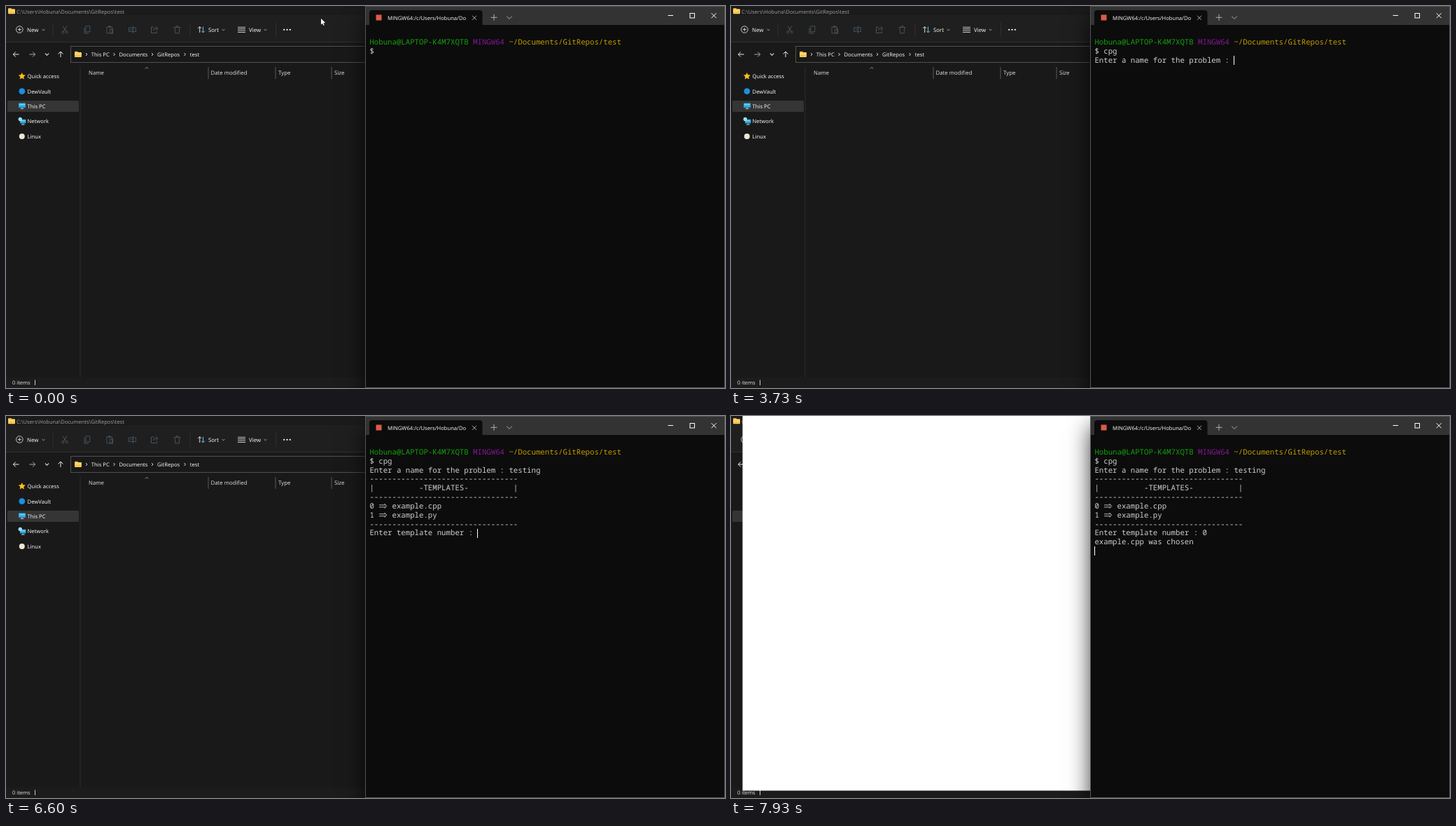
Animation, 1027 px wide and 545 px high, one loop 8000 ms. Source, as an HTML page with a canvas:

```html
<!DOCTYPE html>
<html lang="en">
<head>
<meta charset="utf-8">
<title>Terminal beside a file window</title>
<style>
  html, body { margin: 0; width: 100%; height: 100%; overflow: hidden; background: #0c0c0c; }
  canvas { display: block; }
</style>
</head>
<body>
<canvas id="stage" width="1027" height="545"></canvas>
<script>
const ctx = document.getElementById('stage').getContext('2d');
const LOOP = 8000;
const UI = '"Open Sans", "Noto Sans", sans-serif';
const MONO = '"Noto Sans Mono", "DejaVu Sans Mono", monospace';
const USER = 'Hobuna';
const HOST = 'LAPTOP-K4M7XQTB';

// Terminal grid
const CELL_W = 6.42, CELL_H = 12.83, LEFT = 519.4, TOP = 45.2;
const RULE = '-'.repeat(33);
const GAP = ' '.repeat(10);
const MENU = ['', RULE, '|' + GAP + '-TEMPLATES-' + GAP + '|', RULE,
  '0 => example.cpp', '1 => example.py', RULE, 'Enter template number : '].join('\n');

// Output and key presses: [time, text]
const LOG = [
  [0, '$ '], [1600, 'c'], [1870, 'p'], [2070, 'g'], [2600, '\n'],
  [2800, 'Enter a name for the problem : '],
  [4000, 't'], [4200, 'e'], [4330, 's'], [4530, 't'], [4800, 'i'], [5000, 'n'], [5070, 'g'],
  [5400, MENU], [6730, '0'], [7330, '\nexample.cpp was chosen\n']
];
const CARET_OFF = [[0, 530], [1070, 1600], [3200, 3730], [6070, 6600]];
const POINTER = [[0, 450, 18], [70, 472, 29], [130, 530, 56], [200, 578, 78], [270, 601, 87]];
const POINTER_HIDES = 1670;

function rect(x, y, w, h, color) {
  ctx.fillStyle = color;
  ctx.fillRect(x, y, w, h);
}

function round(x, y, w, h, r, color) {
  ctx.fillStyle = color;
  ctx.beginPath();
  ctx.roundRect(x, y, w, h, r);
  ctx.fill();
}

function dot(x, y, r, color) {
  ctx.fillStyle = color;
  ctx.beginPath();
  ctx.arc(x, y, r, 0, 7);
  ctx.fill();
}

function ring(x, y, r, color, width = 0.9) {
  ctx.strokeStyle = color;
  ctx.lineWidth = width;
  ctx.beginPath();
  ctx.arc(x, y, r, 0, 7);
  ctx.stroke();
}

function box(x, y, w, h, color, width = 0.9) {
  ctx.strokeStyle = color;
  ctx.lineWidth = width;
  ctx.strokeRect(x, y, w, h);
}

// Polyline from a point, then relative steps
function line(x, y, steps, color, width = 1) {
  ctx.strokeStyle = color;
  ctx.lineWidth = width;
  ctx.beginPath();
  ctx.moveTo(x, y);
  for (let i = 0; i < steps.length; i += 2) ctx.lineTo(x += steps[i], y += steps[i + 1]);
  ctx.stroke();
}

function label(text, x, y, size = 7.65, color = '#fff') {
  ctx.font = size + 'px ' + UI;
  ctx.fillStyle = color;
  ctx.fillText(text, x, y);
}

const chevron = (x, y, r, color, width) => line(x - r, y - r / 2, [r, r, r, -r], color, width);
const nextMark = (x, y) => line(x - 1, y - 2, [2, 2, -2, 2], '#ddd', 1);

function folder(x, y) {
  round(x, y, 5, 4, 1, '#e8a33d');
  round(x, y + 1.2, 10, 7, 1, '#fcd462');
  rect(x, y + 5.5, 10, 1.6, '#f5bd45');
}

function star(x, y, r) {
  ctx.fillStyle = '#fcc21b';
  ctx.beginPath();
  for (let i = 0; i < 10; i++) {
    const a = i * Math.PI / 5 - Math.PI / 2, d = i % 2 ? r * 0.48 : r;
    ctx.lineTo(x + d * Math.cos(a), y + d * Math.sin(a));
  }
  ctx.fill();
}

function monitor(x, y, w, h) {
  round(x, y, w, h, 0.8, '#2ea3dc');
  rect(x + 1, y + 1, w - 2, h / 2 - 1, '#62cdf2');
  rect(x + w / 2 - 1, y + h, 2, 1.2, '#8a9aa5');
  rect(x + w / 2 - 2.5, y + h + 1.2, 5, 0.9, '#b8c4cc');
}

function toolbar() {
  const dim = '#46545e';
  ring(19.3, 33.5, 4.8, '#ddd');
  line(16.8, 33.5, [5, 0], '#ddd', 0.9);
  line(19.3, 31, [0, 5], '#ddd', 0.9);
  label('New', 30, 36.8, 7.9);
  label('Sort', 289, 36.8, 7.9);
  label('View', 347, 36.8, 7.9);
  for (const x of [53.5, 310.5, 370.5]) chevron(x, 34, 1.8, '#bbb', 0.9);
  for (const x of [66.5, 262.5, 385]) rect(x, 24, 1, 20, '#303030');

  // Cut, copy, paste, rename, share, delete
  line(81, 28.5, [5, 8], dim);
  line(87, 28.5, [-5, 8], dim);
  ring(81.2, 37.4, 1.6, dim);
  ring(86.8, 37.4, 1.6, dim);
  box(113.8, 28.8, 6, 8, dim);
  line(112, 31, [0, 8, 6, 0], dim);
  box(144, 29.8, 7.5, 9, dim);
  rect(146, 28.4, 3.5, 2.2, dim);
  box(148.5, 33, 4.2, 6, dim);
  box(175.5, 31, 10, 5.5, dim);
  line(181.5, 28.6, [0, 10.4], dim);
  line(177.5, 33.8, [3, 0], dim);
  line(211, 30, [-3.5, 0, 0, 8.5, 8, 0, 0, -2.5], dim);
  line(210.5, 35, [1, -3, 5, 0], dim);
  line(213.8, 29, [3, 3, -3, 3], dim);
  line(239.5, 30.5, [10, 0], dim);
  line(241, 30.5, [0.8, 8.3, 5.4, 0, 0.8, -8.3], dim);
  line(243, 30, [0.5, -1.6, 2, 0, 0.5, 1.6], dim);

  line(276.7, 38, [0, -8.5], '#ddd');
  line(274.2, 32, [2.5, -2.5, 2.5, 2.5], '#ddd');
  line(281.5, 29.5, [0, 8.5], '#6cb8e0');
  line(279, 35.5, [2.5, 2.5, 2.5, -2.5], '#6cb8e0');
  for (let i = 0; i < 4; i++) rect(331, 29.8 + i * 2.4, 11, 0.9, '#ddd');
  for (let i = 0; i < 3; i++) dot(397.2 + i * 4.3, 33.8, 1.15, '#fff');
}

function addressBar() {
  line(18.5, 69, [-8, 0], '#eee');
  line(13.8, 65.5, [-3.5, 3.5, 3.5, 3.5], '#eee');
  line(33.5, 69, [8, 0], '#aaa');
  line(38.2, 65.5, [3.5, 3.5, -3.5, 3.5], '#aaa');
  chevron(58.5, 69, 2.6, '#eee', 1.1);
  line(78, 73, [0, -8], '#eee');
  line(74.5, 68.5, [3.5, -3.5, 3.5, 3.5], '#eee');
  box(92.5, 57.5, 440, 23, '#505050', 1);
  folder(98, 64.8);
  for (const x of [115, 154.5, 209, 255.5]) nextMark(x, 69);
  label('This PC', 121.8, 71.8);
  label('Documents', 161.5, 71.8);
  label('GitRepos', 216, 71.8);
  label('test', 262.8, 71.8);
}

function sidebar() {
  round(2, 135, 102, 16, 1.5, '#353535');
  rect(105.5, 86, 1, 444, '#2d2d2d');
  star(22.8, 100.2, 5.3);
  dot(22.8, 121.6, 4.4, '#1a8fe0');
  monitor(18, 138.5, 10, 6.5);
  monitor(20, 161.8, 8.5, 5.8);
  dot(20.3, 161.5, 2.7, '#9fdcf5');
  dot(22.8, 186, 4, '#eee6d4');
  ['Quick access', 'DewVault', 'This PC', 'Network', 'Linux']
    .forEach((name, i) => label(name, 30.6, 103.1 + i * 21.4));
}

function explorer() {
  rect(0, 0, 514, 545, '#191919');
  rect(0, 0, 514, 13, '#1b1b1b');
  rect(0, 13, 514, 38, '#1f1f1f');
  rect(0, 51, 514, 1, '#303030');
  rect(0, 530, 514, 15, '#1c1c1c');
  folder(3, 3);
  label('C:\\Users\\' + USER + '\\Documents\\GitRepos\\test', 15, 10.8, 7.54, '#a0a0a0');
  toolbar();
  addressBar();
  sidebar();
  label('Name', 118, 98.4, 7.85, '#e2e2e2');
  label('Date modified', 292.5, 98.4, 7.85, '#e2e2e2');
  label('Type', 389, 98.4, 7.85, '#e2e2e2');
  label('Size', 469, 98.4, 7.85, '#e2e2e2');
  for (const x of [288.5, 384.5, 464.5]) rect(x, 87, 1, 17, '#5a5a5a');
  line(198.6, 89.4, [2.4, -2, 2.4, 2], '#999', 0.9);
  label('0 items', 9, 540.3, 7.55, '#e2e2e2');
  rect(41, 533.5, 1, 7.5, '#ccc');
}

// A new window opens in two hard steps
function popup(t) {
  if (t >= 7930) rect(16.5, 0, 500, 534.5, '#fff');
  else if (t >= 7870) rect(45, 13, 470, 505.5, 'rgba(255,255,255,0.475)');
}

function arrow(x, y) {
  line(x + 0.8, y - 1.5, [9.2, 0], '#ccc', 0.9);
  line(x + 0.8, y + 1.5, [9.2, 0], '#ccc', 0.9);
  line(x + 8.2, y - 3.4, [3.4, 3.4, -3.4, 3.4], '#ccc', 0.9);
}

function row(text, n, col = 0, color = '#d0d0d0') {
  ctx.font = '10.7px ' + MONO;
  const y = TOP + n * CELL_H + 9.8;
  for (let i = 0; i < text.length; i++) {
    const x = LEFT + (col + i) * CELL_W;
    if (text.startsWith('=>', i)) {
      arrow(x, y - 3.5);
      i++;
    } else {
      ctx.fillStyle = color;
      ctx.fillText(text[i], x, y);
    }
  }
}

function terminalFrame() {
  ctx.save();
  ctx.shadowColor = 'rgba(0,0,0,0.8)';
  ctx.shadowBlur = 30;
  ctx.shadowOffsetY = 15;
  rect(513.5, 0, 540, 580, '#0c0c0c');
  ctx.restore();
  rect(514, 0, 513, 27, '#333');
  round(519, 6, 161.5, 21.5, [4, 4, 0, 0], '#0c0c0c');
  rect(528.5, 12.5, 8, 8, '#de5a45');
  label('MINGW64:/c/Users/' + USER + '/Do', 545, 19.6, 7.65);
  line(666, 13.8, [6, 6], '#bbb', 0.9);
  line(672, 13.8, [-6, 6], '#bbb', 0.9);
  line(692.5, 16.3, [9, 0], '#bbb', 0.9);
  line(697, 11.8, [0, 9], '#bbb', 0.9);
  chevron(719, 16.5, 3.8, '#bbb', 0.9);
  line(945.5, 13.5, [7.5, 0], '#fff', 1);
  box(977, 10.5, 6.5, 6.5, '#fff', 1);
  line(1007.6, 10.2, [7, 7], '#fff', 1);
  line(1014.6, 10.2, [-7, 7], '#fff', 1);
  box(513.5, 0.5, 513, 544, '#555', 1);
}

function terminal(t) {
  terminalFrame();
  const id = USER + '@' + HOST;
  row(id, 0, 0, '#13a10e');
  row('MINGW64', 0, id.length + 1, '#881798');
  row('~/Documents/GitRepos/test', 0, id.length + 9, '#c19c00');

  const lines = LOG.filter(e => e[0] <= t).map(e => e[1]).join('').split('\n');
  lines.forEach((text, i) => row(text, i + 1));
  if (!CARET_OFF.some(([a, b]) => t >= a && t < b)) {
    const col = lines[lines.length - 1].length;
    rect(Math.floor(LEFT + col * CELL_W), Math.round(TOP + lines.length * CELL_H), 1, 13, '#fff');
  }
}

function pointer(t) {
  if (t >= POINTER_HIDES) return;
  const [, x, y] = POINTER.filter(p => p[0] <= t).pop();
  if (x > 514 && y > 27) {
    line(x - 2, y - 5, [4, 0], '#eee');
    line(x, y - 5, [0, 10], '#eee');
    line(x - 2, y + 5, [4, 0], '#eee');
    return;
  }
  ctx.fillStyle = '#fff';
  ctx.beginPath();
  [[0, 0], [0, 8.6], [2, 6.8], [3.4, 9.8], [4.7, 9.2], [3.4, 6.3], [6.1, 6.1]]
    .forEach(([dx, dy]) => ctx.lineTo(x + dx, y + dy));
  ctx.fill();
}

function draw(t) {
  ctx.textRendering = 'geometricPrecision';
  explorer();
  popup(t);
  terminal(t);
  pointer(t);
}

const start = performance.now();
function tick() {
  draw((performance.now() - start) % LOOP);
  requestAnimationFrame(tick);
}
tick();
</script>
</body>
</html>
```
